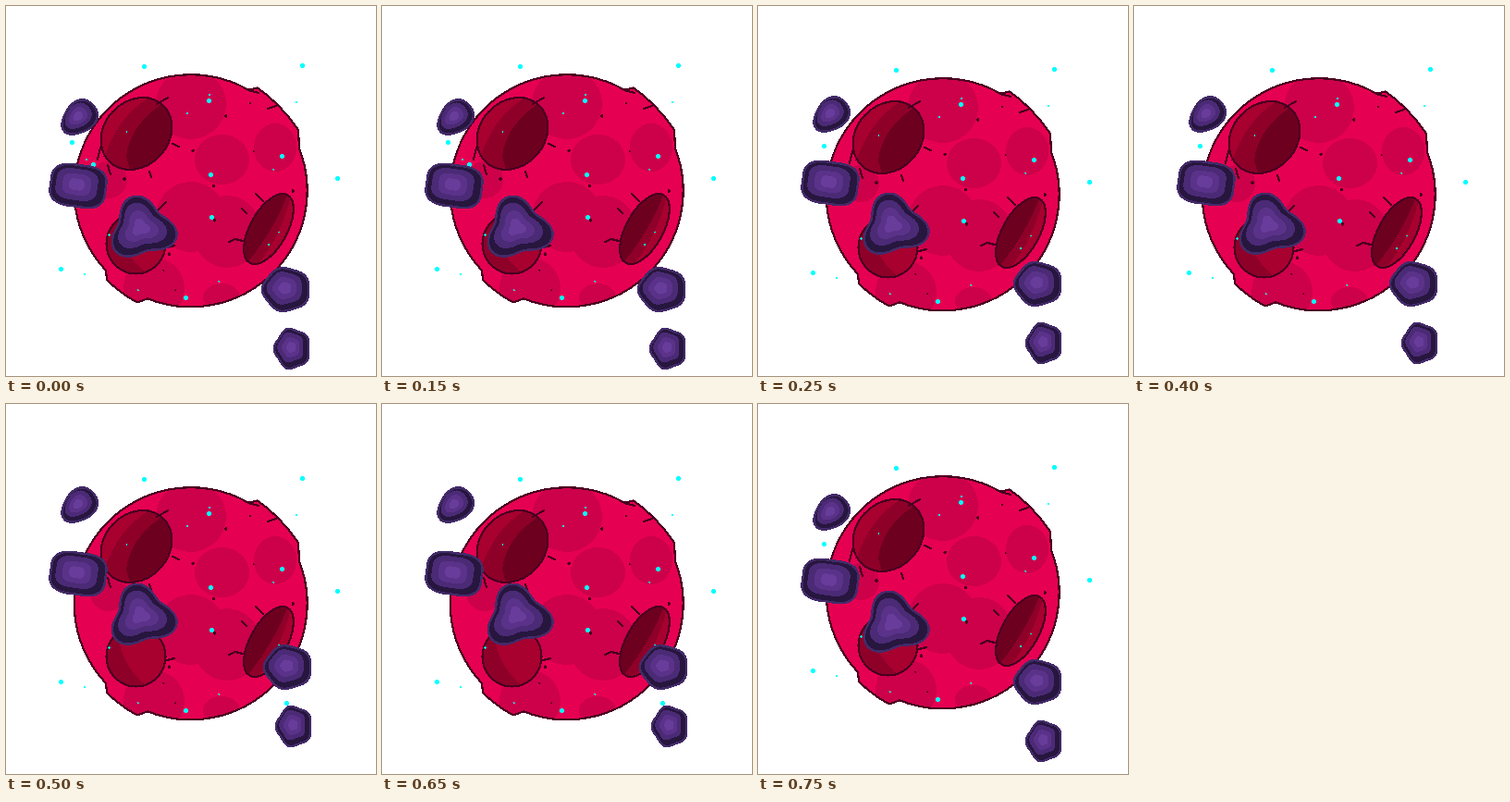
Animation of 400x400 px, one loop 1000 ms. Source, as an HTML page:

```html
<!DOCTYPE html>
<html lang="en">
<head>
<meta charset="utf-8">
<title>Red planet</title>
<style>
  html, body { margin: 0; width: 100%; height: 100%; overflow: hidden; background: #fff; }
  svg { display: block; width: 100vw; height: 100vh; }
  .line { fill: none; stroke: #4a0020; stroke-width: 2.2; stroke-linecap: round; stroke-linejoin: round; }
  .light { fill: #a8002f; }
  .mid { fill: #8f0029; }
  .dark { fill: #6e001f; }
</style>
</head>
<body>
<svg viewBox="0 0 400 400" shape-rendering="crispEdges">
  <defs>
    <path id="body" d="M317 154.1 A126 125.6 0 0 1 153 316.4 L142 320.5 Q124 311 109 296 L108 285.9
      A126 125.6 0 0 1 262 90.6 L272 88.5 Q297 106 316 134 Z"/>
    <ellipse id="bowlA" rx="42" ry="35" transform="translate(141 138) rotate(-47)"/>
    <ellipse id="bowlB" rx="42" ry="20" transform="translate(284 241) rotate(-61)"/>
    <ellipse id="bowlC" cx="140.5" cy="257" rx="32" ry="32.5"/>
    <clipPath id="inBody"><use href="#body"/></clipPath>
    <clipPath id="inA"><use href="#bowlA"/></clipPath>
    <clipPath id="inB"><use href="#bowlB"/></clipPath>
    <clipPath id="inC"><use href="#bowlC"/></clipPath>
  </defs>

  <g id="planet">
    <use href="#body" fill="#e60051"/>
    <g clip-path="url(#inBody)" fill="#cd004a">
      <circle cx="200" cy="106" r="38"/>
      <ellipse cx="291" cy="153" rx="23" ry="26"/>
      <ellipse cx="233.5" cy="166" rx="29.5" ry="27"/>
      <circle cx="200" cy="228" r="38"/>
      <ellipse cx="239" cy="244" rx="37" ry="39"/>
      <circle cx="160" cy="305" r="33"/>
      <ellipse cx="233" cy="315" rx="20" ry="15"/>
      <circle cx="111" cy="188" r="20"/>
    </g>
    <g id="specks" fill="#4a0020"></g>

    <use href="#bowlA" class="light"/>
    <g clip-path="url(#inA)">
      <path class="mid" d="M160 96 Q122 116 106 164 L125 190 L190 180 L190 95 Z"/>
      <path class="dark" d="M175 102 Q134 126 130 163 L136 184 L190 180 L190 102 Z"/>
    </g>
    <use href="#bowlB" class="light"/>
    <g clip-path="url(#inB)">
      <path class="mid" d="M309 200 Q300 246 270 282 L250 285 L250 200 Z"/>
      <path class="dark" d="M306 200 Q291 240 264 274 L250 285 L250 200 Z"/>
    </g>
    <use href="#bowlC" class="light"/>
    <path class="mid" clip-path="url(#inC)" d="M120 222 Q122 268 156 292 L100 292 L100 222 Z"/>

    <g class="line">
      <use href="#bowlA"/>
      <use href="#bowlB"/>
      <use href="#bowlC"/>
      <path d="M155 179 L157 185 M180 149 L187 152 M165 220 L173 212 M270 203 L278 211
        M255 219 L260 224 M241 255 L248 252 L256 254 M174 261 L182 259 M163 106 L175 99
        M102 153 L99 166 M110 172 L113 182 M283 111 L292 108 M262 91 L273 94"/>
      <use href="#body"/>
    </g>
    <g id="stars" fill="#00ffff"></g>
  </g>
  <g id="left"></g>
  <g id="right"></g>
</svg>

<script>
const NS = "http://www.w3.org/2000/svg";
const RAD = Math.PI / 180;
const $ = id => document.getElementById(id);

function add(id, tag, attrs) {
  const el = document.createElementNS(NS, tag);
  for (const k in attrs) el.setAttribute(k, attrs[k]);
  $(id).appendChild(el);
}

const dot = (id, cx, cy, r) => add(id, "circle", { cx, cy, r });

let seed = 7;
const random = () => (seed = seed * 16807 % 2147483647) / 2147483647;

// Dots spread evenly in angle, at random distances from the planet's centre
function scatter(id, count, near, far, r) {
  for (let i = 0; i < count; i++) {
    const a = (i + random()) / count * 2 * Math.PI;
    const d = near + (far - near) * random();
    dot(id, 200 + d * Math.cos(a), 200 + d * Math.sin(a), r);
  }
}

// An ellipse whose radius swells in a number of lobes, the first one at angle turn
function rock(id, { x, y, rx, ry, tilt = 0, lobes, swell, turn }) {
  const points = [];
  for (let a = 0; a < 360; a += 6) {
    const r = 1 + swell * Math.cos(lobes * (a - turn) * RAD);
    points.push([rx * r * Math.cos(a * RAD), ry * r * Math.sin(a * RAD)]);
  }
  const layer = (size, shift, fill, stroke) => add(id, "polygon", {
    points: points.join(" "), fill, stroke, "stroke-width": 2.4,
    transform: `translate(${x - shift} ${y - shift}) rotate(${tilt}) scale(${size})`
  });
  layer(1, 0, "#27163e", "#432b69");
  layer(0.76, 1.5, "#4b2a76", "none");
  layer(0.52, 1.5, "#5a3289", "none");
  layer(0.28, 1.5, "#673c9a", "none");
}

scatter("specks", 9, 20, 118, 1.8);
scatter("specks", 7, 60, 120, 0.9);
scatter("stars", 12, 80, 155, 1.1);
const bright = "149,65 320,64 219,102 298,162 71,147 94,171 221,182 358,186 222,228 59,284 194,315 303,307";
for (const p of bright.split(" ")) {
  const [x, y] = p.split(",").map(Number);
  dot("stars", x + 0.5, y + 0.5, 2.5);
}

rock("left", { x: 79.5, y: 120.5, rx: 21, ry: 16, tilt: -42, lobes: 3, swell: 0.06, turn: 180 });
rock("left", { x: 78, y: 194.5, rx: 32, ry: 24, tilt: 8, lobes: 4, swell: 0.07, turn: 45 });
rock("left", { x: 147, y: 241, rx: 32, ry: 30, lobes: 3, swell: 0.2, turn: 16 });
rock("right", { x: 303, y: 306.5, rx: 25, ry: 23, lobes: 5, swell: 0.04, turn: 36 });
rock("right", { x: 309.5, y: 370.5, rx: 18.5, ry: 21, lobes: 5, swell: 0.06, turn: 36 });

const STEP = 250;

function move(id, x, y) {
  $(id).setAttribute("transform", `translate(${Math.floor(x)} ${Math.round(y)})`);
}

const start = performance.now();
function draw(now) {
  const step = Math.floor(Math.max(0, now - start) / STEP) % 4;
  const k = 2 - Math.abs(2 - step);
  const sway = k * k;              // 0, 1, 4, 1
  move("planet", 0, 4 * sway);
  move("left", 0, -2.8 * sway);
  move("right", 0.5 * sway, -5.6 * sway);
  requestAnimationFrame(draw);
}
draw(start);
</script>
</body>
</html>
```
